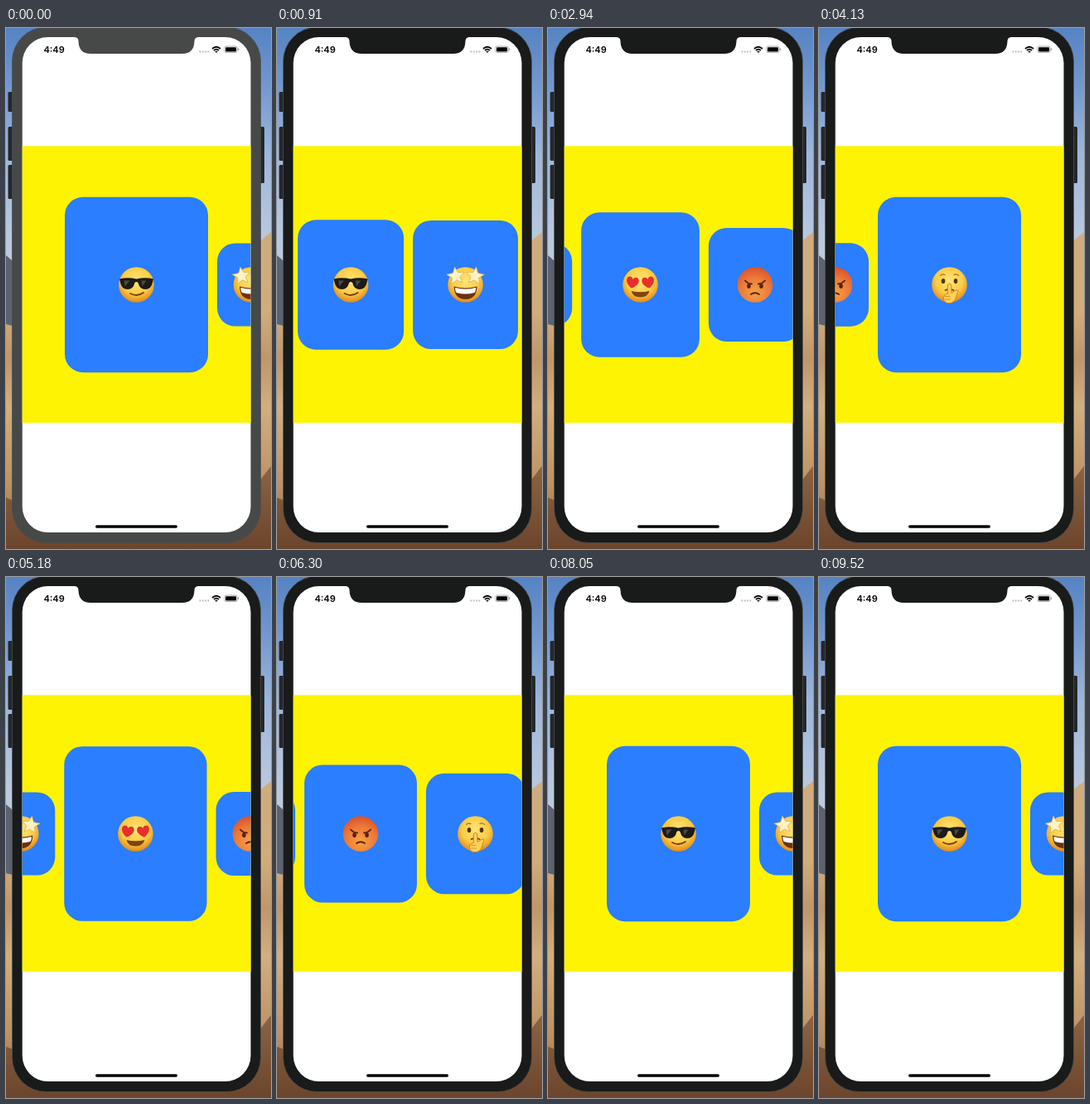
These frames come from a looping animation (320x628 px, 9590 ms). An HTML page:

```html
<!DOCTYPE html>
<html lang="en">
<head>
<meta charset="utf-8">
<title>Card carousel</title>
<style>
  html, body { margin: 0; width: 100%; height: 100%; overflow: hidden; background: #c2945f; }
  svg { display: block; width: 100vw; height: 100vh; }
  .bezel { fill: #191a1a; animation: wake 9590ms step-end infinite; }
  .button { fill: #24272b; }
  .clock { font: 600 11px Inter, "Liberation Sans", sans-serif; fill: #050505; }
  @keyframes wake { 0% { fill: #474949; } 4.4%, 100% { fill: #191a1a; } }
</style>
</head>
<body>
<svg viewBox="0 0 320 628">
  <defs>
    <linearGradient id="sky" x2="0" y2="1">
      <stop offset="0" stop-color="#5583c3"/>
      <stop offset=".18" stop-color="#7096cf"/>
      <stop offset=".42" stop-color="#9db6db"/>
      <stop offset=".7" stop-color="#b9c8de"/>
      <stop offset="1" stop-color="#c9d0da"/>
    </linearGradient>
    <linearGradient id="dune" x2="0" y2="1">
      <stop offset="0" stop-color="#cfac7e"/>
      <stop offset=".25" stop-color="#d2ac7b"/>
      <stop offset=".4" stop-color="#c0966a"/>
      <stop offset=".55" stop-color="#d3ae7e"/>
      <stop offset=".8" stop-color="#be9163"/>
      <stop offset="1" stop-color="#94683f"/>
    </linearGradient>
    <linearGradient id="shade" x2="0" y2="1">
      <stop offset="0" stop-color="#8d6342"/>
      <stop offset="1" stop-color="#6b452c"/>
    </linearGradient>
    <radialGradient id="gold" cx=".5" cy=".38" r=".64">
      <stop offset="0" stop-color="#ffe676"/>
      <stop offset=".6" stop-color="#fbcb45"/>
      <stop offset="1" stop-color="#df8416"/>
    </radialGradient>
    <radialGradient id="rage" cx=".5" cy=".72" r=".76">
      <stop offset="0" stop-color="#f6a144"/>
      <stop offset=".55" stop-color="#ec7a38"/>
      <stop offset="1" stop-color="#d84d26"/>
    </radialGradient>
    <clipPath id="screen"><rect x="19.700" y="11" width="275.800" height="597" rx="31"/></clipPath>
    <path id="star" d="M0-11 3-4 10.8-3.4 4.8 1.6 6.6 9 0 5-6.6 9-4.8 1.6-10.8-3.4-3-4Z"
      fill="#fff3c4" stroke="#e3b04a" stroke-width=".8" stroke-linejoin="round"/>
    <path id="heart" d="M0 8C-5 5-8.6 1-8.2-3.200-7.800-8-1.500-8.500 0-4 1.500-8.500 7.800-8 8.200-3.200 8.600 1 5 5 0 8Z" fill="#e5302c"/>

    <g id="cool">
      <circle r="21.300" fill="url(#gold)"/>
      <path d="M-20.500-7Q-10-9.500 0-7 10-9.500 20.500-7L19.500-3Q18 5.500 10.500 5.500 4 5.500 2-2.500 0-4.500-2-2.500-4 5.500-10.500 5.500-18 5.500-19.500-3Z" fill="#1d1a17"/>
      <path d="M-15-5-8-5-14 2ZM6-5 12-5 7 2Z" fill="#4d4842"/>
      <path d="M-7.500 10.500Q1 15 8.500 9.500" fill="none" stroke="#75400f" stroke-width="1.900" stroke-linecap="round"/>
    </g>
    <g id="starry">
      <circle r="21.300" fill="url(#gold)"/>
      <path d="M-14 2Q0 6 14 2 13.500 17.500 0 17.500-13.500 17.500-14 2Z" fill="#6b3214"/>
      <path d="M-12.500 3.500Q0 7 12.500 3.500 12.500 8 11 9.500 0 12.500-11 9.500-12.500 8-12.500 3.500Z" fill="#fff"/>
      <use href="#star" transform="translate(-11.500 -10.500) rotate(-8)"/>
      <use href="#star" transform="translate(11.500 -10.500) rotate(8)"/>
    </g>
    <g id="love">
      <circle r="21.300" fill="url(#gold)"/>
      <use href="#heart" transform="translate(-9.500 -3) rotate(10) scale(.9)"/>
      <use href="#heart" transform="translate(9.500 -3) rotate(-10) scale(.9)"/>
      <path d="M-11 7.500Q0 10 11 7.500 9 15 0 15-9 15-11 7.500Z" fill="#80430f"/>
    </g>
    <g id="angry">
      <circle r="21.300" fill="url(#rage)"/>
      <g fill="#5a2210">
        <ellipse cx="-7.500" cy="1.500" rx="2.300" ry="3"/>
        <ellipse cx="7.500" cy="1.500" rx="2.300" ry="3"/>
      </g>
      <path d="M-12-5Q-9-1.500-4-1M12-5Q9-1.500 4-1M-5 11.500Q0 8 5 11.500"
        fill="none" stroke="#5a2210" stroke-width="1.900" stroke-linecap="round"/>
    </g>
    <g id="hush">
      <circle r="21.300" fill="url(#gold)"/>
      <g fill="#573108">
        <ellipse cx="-7.500" cy="-4.500" rx="2.300" ry="3.100"/>
        <ellipse cx="7.500" cy="-4.500" rx="2.300" ry="3.100"/>
      </g>
      <path d="M-11-11Q-9-13.500-5.500-12M11-11Q9-13.500 5.500-12" fill="none" stroke="#a8691c" stroke-width="1.200" stroke-linecap="round"/>
      <path d="M-5 6.500Q0 4.500 5 6.500" fill="none" stroke="#75400f" stroke-width="1.800" stroke-linecap="round"/>
      <path d="M-2.200 0Q0-3 2.200 0L2.500 10 8 6.500Q11.500 5.500 10 9L7 18Q4 23-3 22-8 20-7 14 -6 11-2.200 11Z"
        fill="#fdd057" stroke="#cf8420" stroke-width="1" stroke-linejoin="round"/>
      <path d="M-6 14H1M-5.500 17.500H1" stroke="#cf8420" stroke-width=".8"/>
    </g>
  </defs>

  <rect width="320" height="360" fill="url(#sky)"/>
  <path d="M0 274 8 281V362H0Z" fill="#5c626f"/>
  <path d="M0 357 8 359 300 262 320 246V628H0Z" fill="url(#dune)"/>
  <path d="M0 566Q90 606 200 604 290 580 306 546L320 528V628H0Z" fill="url(#shade)"/>

  <g class="button">
    <rect x="2.500" y="77" width="7" height="24" rx="1.500"/>
    <rect x="2.500" y="119" width="7" height="41" rx="1.500"/>
    <rect x="2.500" y="165" width="7" height="41" rx="1.500"/>
    <rect x="305" y="119" width="7" height="68" rx="1.500"/>
  </g>
  <rect class="bezel" x="7.500" y="-1" width="300" height="621.500" rx="41" stroke="#4b4d4e" stroke-width=".8"/>

  <g clip-path="url(#screen)">
    <rect x="19" y="10" width="278" height="600" fill="#fff"/>
    <rect x="19" y="142.300" width="278" height="333.500" fill="#fef303"/>
    <g id="cards"></g>
    <rect x="108" y="599.300" width="99" height="3.400" rx="1.700" fill="#050505"/>
  </g>
  <path class="bezel" d="M83 10V11Q87.500 11.500 87.500 16 88 31 102 31H213Q227 31 227.500 16 227.500 11.500 232 11V10Z"/>

  <text class="clock" x="45.500" y="29.500">4:49</text>
  <path d="M233.500 28.500h12" stroke="#bbb" stroke-width="1.800" stroke-dasharray="1.800 1.500"/>
  <g fill="none" stroke="#050505" stroke-width="1.700">
    <path d="M249 25Q254 20.500 259 25M251 27Q254 24.300 257 27"/>
    <path d="M252.700 28.200h2.600L254 29.500Z" stroke-width=".8" fill="#050505"/>
  </g>
  <rect x="263.800" y="22" width="15.500" height="7.600" rx="2.200" fill="none" stroke="#999" stroke-width=".8"/>
  <rect x="265" y="23.200" width="13.100" height="5.200" rx="1.200" fill="#050505"/>
  <path d="M280.500 24.500v2.600" stroke="#999" stroke-width="1"/>
</svg>
<script>
  const LOOP = 9590, MID_X = 157.5, MID_Y = 309.5;
  const SMALL = 82, GROW = 91, GAP = 11, ASPECT = 1.2225;
  const STEP = SMALL + GROW / 2 + GAP;

  // Swipes: start, end, card centred before, card centred after
  const swipes = [
    [600, 1500, 0, 1],
    [1960, 2660, 1, 2],
    [2715, 3615, 2, 3],
    [3650, 4150, 3, 4],
    [4200, 5300, 4, 2],
    [5310, 6000, 2, 4],
    [6064, 7765, 4, 0]
  ];

  const set = (el, attrs) => {
    for (const key in attrs) el.setAttribute(key, attrs[key]);
  };
  const make = (tag, attrs, parent) => {
    const el = document.createElementNS("http://www.w3.org/2000/svg", tag);
    set(el, attrs);
    return parent.appendChild(el);
  };

  const holder = document.getElementById("cards");
  const cards = ["cool", "starry", "love", "angry", "hush"].map(name => ({
    box: make("rect", { rx: 22, fill: "#2a7eff" }, holder),
    face: make("use", { href: "#" + name }, holder)
  }));

  const flick = u => 1 - (1 - u ** 1.5) ** 3;

  function position(t) {
    let pos = 0;
    for (const [start, end, from, to] of swipes) {
      if (t < start) break;
      pos = from + (to - from) * flick(Math.min(1, (t - start) / (end - start)));
    }
    return pos;
  }

  function draw(t) {
    const pos = position(t), base = Math.floor(pos);
    const width = i => SMALL + GROW * Math.max(0, 1 - Math.abs(i - pos));
    const pitch = i => (width(i) + width(i + 1)) / 2 + GAP;
    cards.forEach(({ box, face }, i) => {
      let x = MID_X - (pos - base) * STEP;
      for (let k = base; k < i; k++) x += pitch(k);
      for (let k = i; k < base; k++) x -= pitch(k);
      const w = width(i), h = w * ASPECT;
      set(box, { x: x - w / 2, y: MID_Y - h / 2, width: w, height: h });
      set(face, { transform: `translate(${x} ${MID_Y})` });
    });
  }

  function tick() {
    draw(performance.now() % LOOP);
    requestAnimationFrame(tick);
  }
  tick();
</script>
</body>
</html>
```
